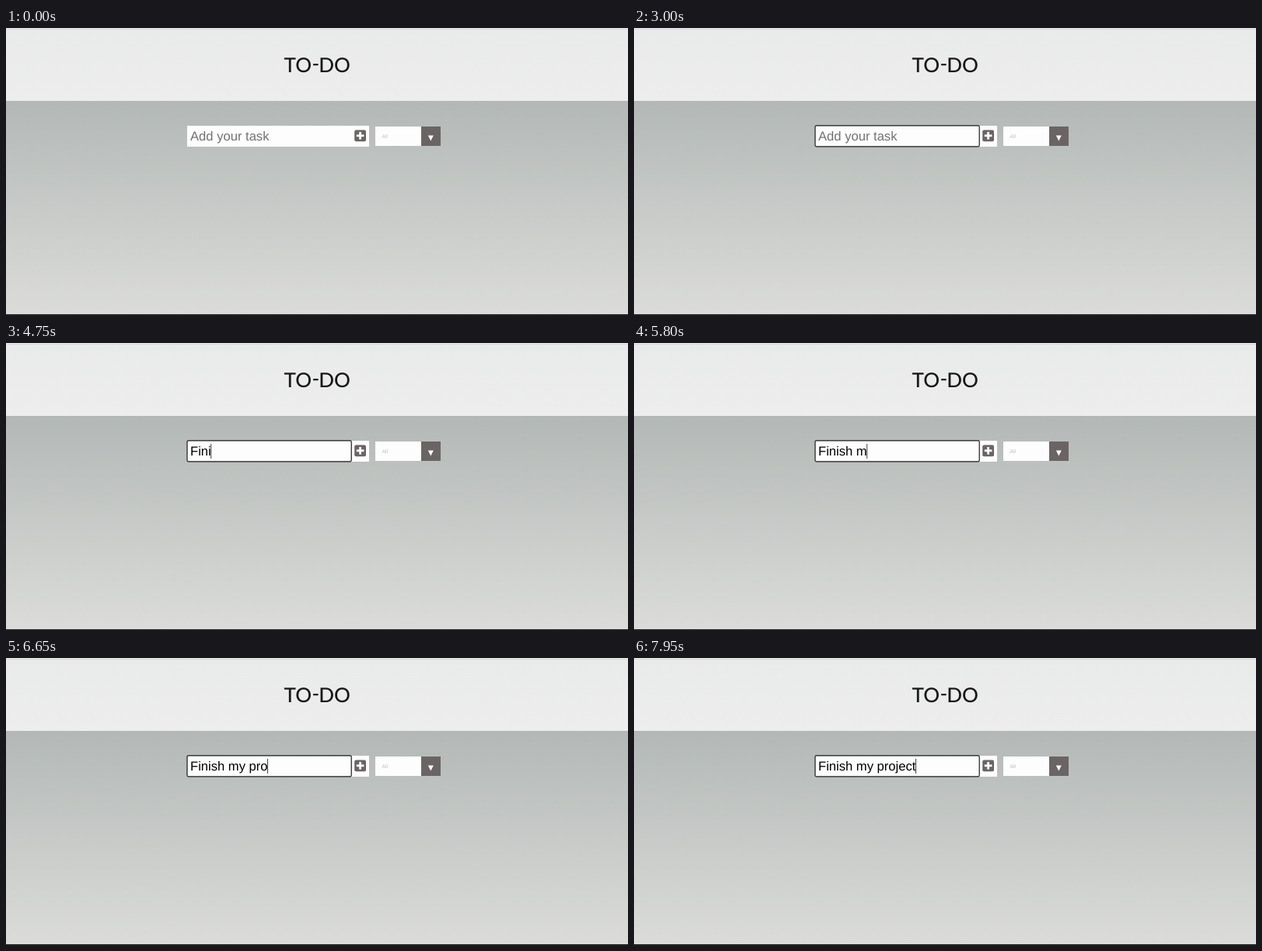
Recreate the animation shown at these times as an HTML page with a canvas. Size 800x370 px, loop 8 s.

```html
<!DOCTYPE html>
<html lang="en">
<head>
<meta charset="utf-8">
<title>To-do</title>
<style>
  html, body { margin: 0; width: 100%; height: 100%; overflow: hidden; }
  canvas { display: block; width: 800px; height: 370px; }
</style>
</head>
<body>
<canvas id="stage" width="800" height="370"></canvas>
<script>
const ctx = document.getElementById('stage').getContext('2d');
const LOOP = 8000;
const FOCUS_AT = 1450;
const TASK = 'Finish my project';
const KEY_TIMES = [4200, 4450, 4600, 4750, 4900, 5000, 5200, 5550, 5950,
                   6100, 6300, 6450, 6600, 6850, 7100, 7300, 7850];
const CARET_TOGGLES = [1450, 1950, 2450, 3000, 3550, 4050, 4200];
const SANS = '"Liberation Sans", Arial, sans-serif';
const GREY = '#6a6564';

const countPast = (times, t) => times.filter(at => t >= at).length;

function rect(x, y, w, h, fill) {
  ctx.fillStyle = fill;
  ctx.fillRect(x, y, w, h);
}

function text(str, x, y, font, fill, align = 'left') {
  ctx.font = font;
  ctx.fillStyle = fill;
  ctx.textAlign = align;
  ctx.fillText(str, x, y);
}

function vertical(y0, y1, from, to) {
  const g = ctx.createLinearGradient(0, y0, 0, y1);
  g.addColorStop(0, from);
  g.addColorStop(1, to);
  return g;
}

function drawPage() {
  rect(0, 94, 800, 275, vertical(94, 369, '#b3b8b6', '#dbdcd9'));
  rect(0, 0, 800, 94, vertical(0, 94, '#e9eaea', '#ededed'));
  rect(0, 1, 800, 1, '#d3d9d8');
  rect(0, 369, 800, 1, '#1c1c1c');

  const font = '500 26px Lato, sans-serif';
  text('TO', 357.6, 57, font, '#181818');
  text('-', 398.3, 55, font, '#181818', 'center');
  text('DO', 442.8, 57, font, '#181818', 'right');
}

function drawAddButton() {
  ctx.fillStyle = GREY;
  ctx.beginPath();
  ctx.roundRect(448.2, 131.4, 14.8, 14.8, 2);
  ctx.fill();
  rect(454.2, 134, 2.8, 9.6, '#fff');
  rect(450.8, 137.4, 9.6, 2.8, '#fff');
}

function drawFilter() {
  rect(475, 127, 59, 25, '#fdfdfd');
  text('All', 483.6, 142, '6.7px ' + SANS, '#bdbdbd');
  rect(534, 127, 25, 25, GREY);
  ctx.fillStyle = '#fff';
  ctx.beginPath();
  ctx.moveTo(542.8, 138.6);
  ctx.lineTo(549.8, 138.6);
  ctx.lineTo(546.3, 145.4);
  ctx.fill();
}

function drawInput(t) {
  rect(233, 126, 234, 27, '#fdfdfd');
  drawAddButton();

  if (t >= FOCUS_AT) {
    ctx.strokeStyle = '#1a1a1a';
    ctx.lineWidth = 1.2;
    ctx.beginPath();
    ctx.roundRect(233, 125.9, 211.2, 26.9, 1.5);
    ctx.stroke();
  }

  const font = '16.6px ' + SANS;
  const typed = TASK.slice(0, countPast(KEY_TIMES, t));
  text(typed || 'Add your task', 237, 145, font, typed ? '#000' : '#717171');

  if (countPast(CARET_TOGGLES, t) % 2) {
    const x = 237 + ctx.measureText(typed).width;
    rect(x - 0.4, 130, 0.85, 19, '#222');
  }
}

function draw(now) {
  const t = now % LOOP;
  ctx.textRendering = 'geometricPrecision';
  drawPage();
  drawInput(t);
  drawFilter();
  requestAnimationFrame(draw);
}

requestAnimationFrame(draw);
</script>
</body>
</html>
```
